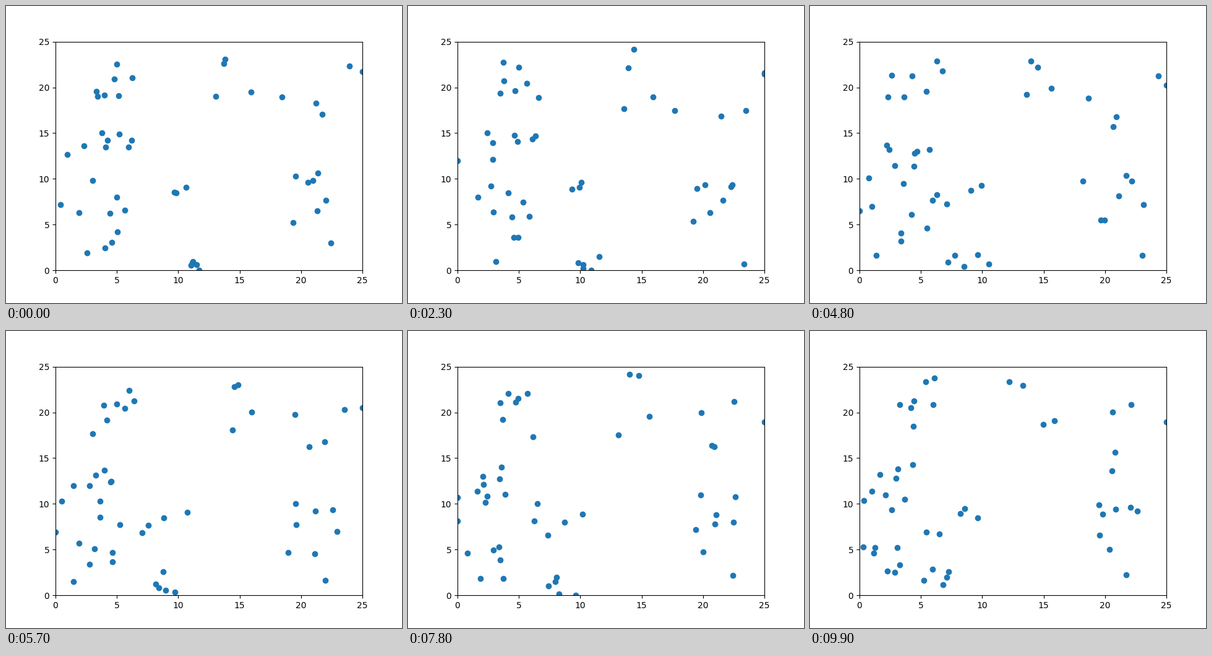
These frames come from a looping animation (640x480 px, 10 s). A matplotlib script:

```python
import numpy as np
import matplotlib.pyplot as plt
from matplotlib.animation import FuncAnimation

FRAMES, INTERVAL, SIZE = 100, 100, 25
STEP, PULL = 0.5, 0.06

# dots in the flock, first centre, last centre, spread
FLOCKS = [
    (7, (4.8, 20.5), (5, 21.5), (3, 1.5)),
    (5, (14.5, 22), (14.8, 21.8), (2.5, 1.4)),
    (4, (22.3, 20), (21.5, 17.2), (1.8, 2)),
    (8, (4, 13.8), (2.8, 12), (2.2, 1.2)),
    (6, (4, 8.3), (4, 7.6), (2.6, 1.5)),
    (3, (9.8, 8.7), (7.3, 8.8), (0.6, 0.8)),
    (4, (4.3, 2.8), (3.5, 3), (1.8, 1.3)),
    (5, (11.4, 0.6), (6.5, 1.8), (0.2, 0.4)),
    (5, (20, 9.5), (20.3, 8.5), (1.9, 1.2)),
    (3, (20.5, 4.2), (19.8, 4), (1.8, 1.6)),
]


def wander(rng, n):
    """Uniform random steps, gently pulled back to the dot's home."""
    offset = np.zeros((FRAMES, n, 2))
    for i in range(1, FRAMES):
        step = rng.uniform(-STEP, STEP, (n, 2))
        offset[i] = (1 - PULL) * offset[i - 1] + step
    return offset


def flock_path(rng, n, first, last, spread):
    t = np.linspace(0, 1, FRAMES)[:, None, None]
    centre = np.array(first) + t * np.subtract(last, first)
    home = rng.normal(0, spread, (n, 2))
    return centre + home + wander(rng, n)


rng = np.random.default_rng(7)
path = np.concatenate([flock_path(rng, *flock) for flock in FLOCKS], axis=1)
path = np.clip(path, 0, SIZE)

fig, ax = plt.subplots(figsize=(6.4, 4.8), dpi=100)
ax.set(xlim=(0, SIZE), ylim=(0, SIZE))
dots, = ax.plot(*path[0].T, "o", color="C0")


def update(i):
    dots.set_data(*path[i].T)
    return dots,


anim = FuncAnimation(fig, update, frames=FRAMES, interval=INTERVAL,
                     repeat=True, repeat_delay=0)
plt.show()
```
